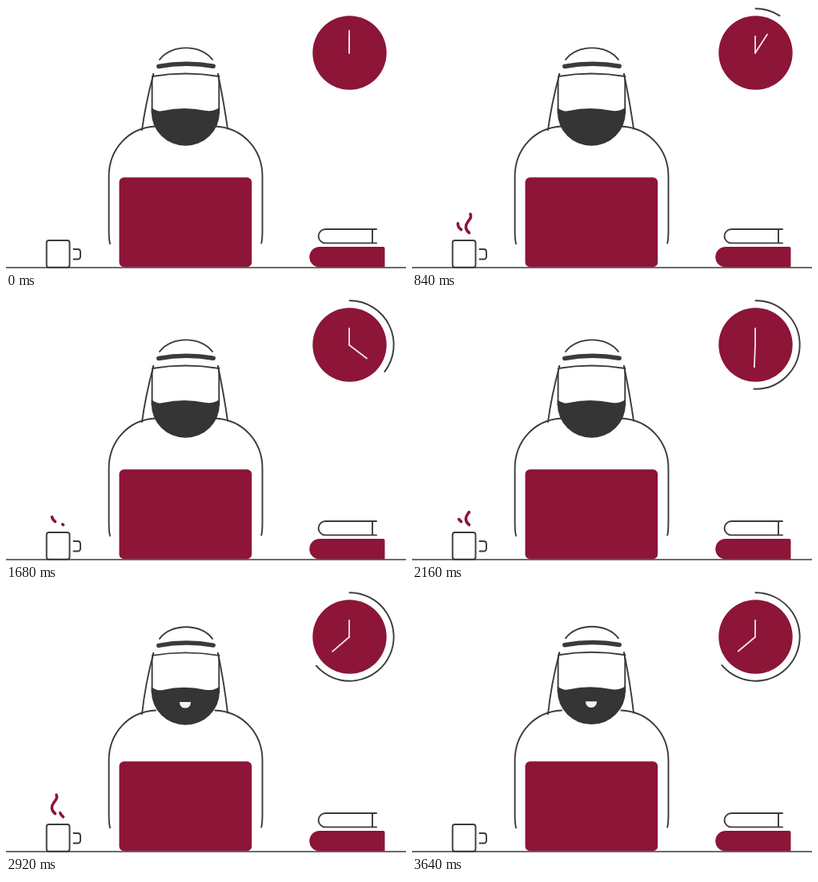
An HTML page that plays this animation: 500 by 330 pixels, repeating every 4000 ms.

```html
<!DOCTYPE html>
<html lang="en">
<head>
<meta charset="utf-8">
<title>Desk and clock</title>
<style>
  html, body { margin: 0; width: 100%; height: 100%; overflow: hidden; background: #fff; }
  svg { display: block; }
  .line { fill: none; stroke: #3b3b3b; stroke-width: 1.9; stroke-linecap: round; }
  .red { fill: #8c1538; }
  .dark { fill: #353535; }
  .hand { stroke: #f5e4e9; stroke-width: 1.8; stroke-linecap: round; }
  .steam { fill: none; stroke: #8c1538; stroke-width: 3.6; stroke-linecap: round; }
</style>
</head>
<body>
<svg width="500" height="330" viewBox="0 0 500 330">
  <g class="line">
    <path id="scarf"/>
    <path d="M130 297.300Q128.600 292 128.600 280V213C128.600 179 153 152 187 150.500M261.500 150.500C296 152 320.500 179 320.500 213V280Q320.500 292 319.200 296.500"/>
  </g>

  <g id="head">
    <path class="line" d="M192 67C206 47.500 244 47.500 258 67M183 88Q224 81 266.500 88M184.300 85Q182.600 89 182.600 95V134M265 85Q266.300 89 266.300 95V134"/>
    <path class="line" style="stroke-width:5.500" d="M190.800 75.500Q225 69 259.200 75.200"/>
    <path class="dark" d="M181.800 127Q189 132.800 196 131Q222 125 249 130.800Q258 132.500 267 127V133A42.600 41.800 0 0 1 181.800 133Z"/>
    <path id="mouth" fill="#f2f2f2" d="M-7 -4H7C7 6.300 -7 6.300 -7 -4Z"/>
  </g>

  <rect class="red" x="141.500" y="214.300" width="165.700" height="112" rx="6"/>

  <g class="line">
    <rect x="50.700" y="293" width="28.800" height="33.800" rx="3"/>
    <path d="M84.500 304H89.500Q93 304 93 307.500V313Q93 316.500 89.500 316.500H84.500"/>
    <path d="M463 279H399.300A8.700 8.700 0 0 0 399.300 296.400H463M458 279V296.400"/>
  </g>
  <path class="red" d="M392 301H471.500Q473.500 301 473.500 303V326.500H392A12.700 12.700 0 0 1 392 301Z"/>
  <path class="line" style="stroke-width:1.700" d="M0 327H500"/>

  <path class="steam" pathLength="1" d="M61.500 279.500C56 275.500 56.500 270 60 265.500C64 260.500 64.300 259 62.800 255.800"/>
  <path class="steam" pathLength="1" transform="translate(10 4)" d="M61.500 279.500C56 275.500 56.500 270 60 265.500C64 260.500 64.300 259 62.800 255.800"/>

  <circle class="red" cx="429.500" cy="58.500" r="46.200"/>
  <path id="ring" class="line"/>
  <path class="hand" d="M429 58.700V38"/>
  <path id="hour" class="hand" d="M429 58.700V31"/>
</svg>
<script>
  const LOOP = 4000;
  const $ = id => document.getElementById(id);
  const steams = document.querySelectorAll('.steam');

  // sine ease from 0 to 1 between two times
  const ease = (t, from, to) => {
    const x = Math.min(1, Math.max(0, (t - from) / (to - from)));
    return (1 - Math.cos(Math.PI * x)) / 2;
  };

  // each wisp grows and shrinks twice
  const wisp = t => ease(t, 580, 1240) - ease(t, 1240, 1915)
                  + ease(t, 1915, 2885) - ease(t, 2885, 3450);

  function drawClock(t) {
    const deg = 230 * ease(t, 120, 3040);
    const a = deg * Math.PI / 180;
    const x = 429.5 + 55.2 * Math.sin(a), y = 58.5 - 55.2 * Math.cos(a);
    $('hour').setAttribute('transform', `rotate(${deg} 429 58.7)`);
    $('ring').setAttribute('d', deg < 0.5 ? '' :
      `M429.5 3.3A55.2 55.2 0 ${deg > 180 ? 1 : 0} 1 ${x} ${y}`);
  }

  function drawHead(t) {
    const lift = 6.7 * ease(t, 2500, 3020);
    const top = 85 - lift;
    $('head').setAttribute('transform', `translate(0 ${-lift})`);
    $('scarf').setAttribute('d',
      `M184.300 ${top}Q174 ${124 - lift} 170 155M265 ${top}Q273 ${124 - lift} 277 153.500`);
    $('mouth').setAttribute('transform', `translate(224 150) scale(${ease(t, 2640, 2900)})`);
  }

  function drawSteam(t) {
    steams.forEach((s, i) => {
      const p = wisp(t + 350 * i);
      s.style.visibility = p > 0.005 ? 'visible' : 'hidden';
      s.setAttribute('stroke-dasharray', `${p} 2`);
    });
  }

  function draw(now) {
    const t = now % LOOP;
    drawClock(t);
    drawHead(t);
    drawSteam(t);
    requestAnimationFrame(draw);
  }
  draw(performance.now());
</script>
</body>
</html>
```
